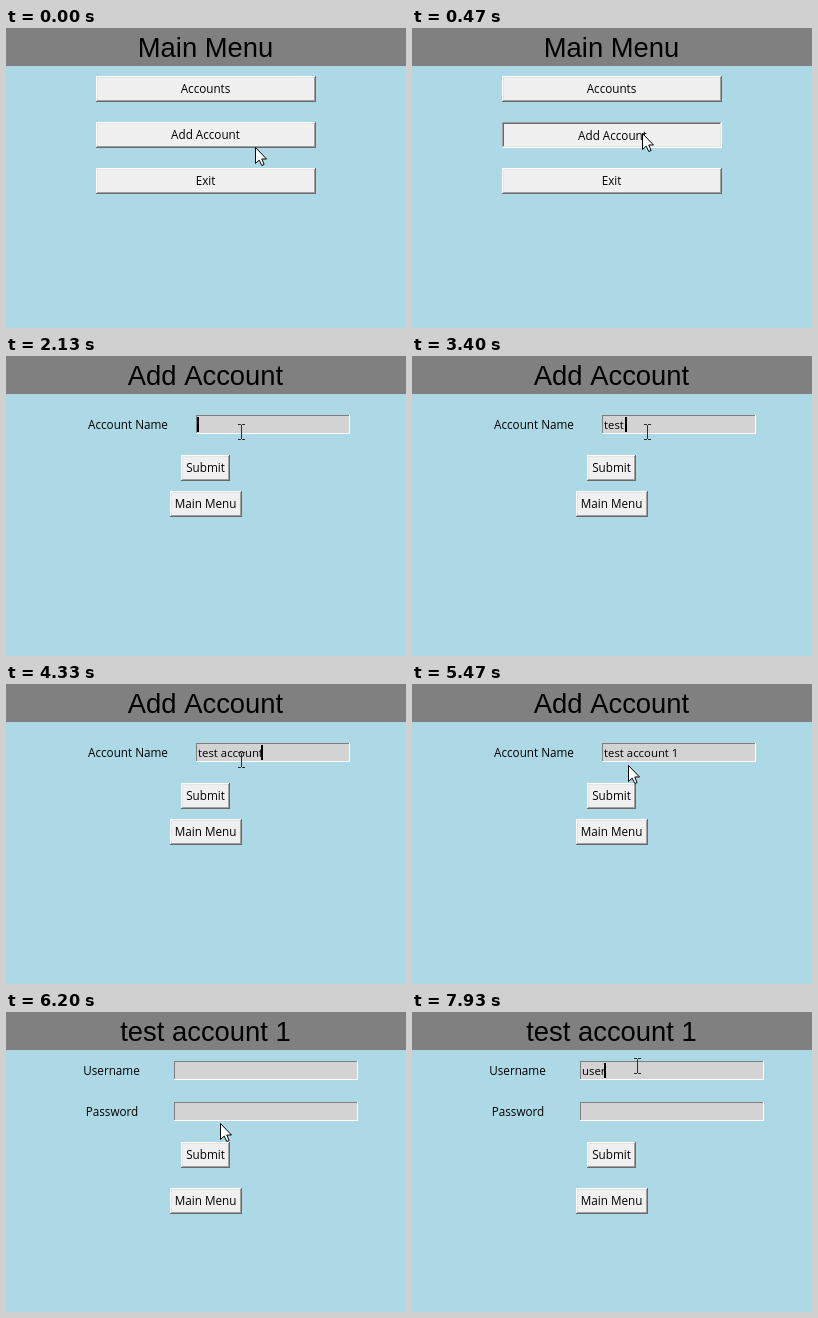
Write an HTML page with a canvas that moves like this. It is 400 px wide and 300 px high and loops after 8 s.

```html
<!DOCTYPE html>
<html lang="en">
<head>
<meta charset="utf-8">
<title>Account manager</title>
<style>
  html, body { margin: 0; overflow: hidden; background: #add8e6; }
  canvas { display: block; }
</style>
</head>
<body>
<canvas id="stage" width="400" height="300"></canvas>
<script>
const ctx = document.getElementById('stage').getContext('2d');
const LOOP = 8000;
const UI_FONT = '11.7px "Open Sans", sans-serif';
const ENTRY_FONT = '11.4px "Open Sans", sans-serif';
const TITLE_FONT = '27.4px "Liberation Sans", Arial, sans-serif';
const CENTER = 199.5;
const ROW = 19;
const BUTTON_HEIGHT = 26;

// Each burst of typing has a text, a start time and a steady pace per key
const accountName = {
  label: 'Account Name', labelX: 122, x: 190, y: 59, w: 154, focus: 1200,
  bursts: [['t', 2470, 0], ['est account ', 2870, 145], ['1', 5200, 0]]
};
const username = {
  label: 'Username', labelX: 105.5, x: 168, y: 49, w: 184, focus: 6600,
  bursts: [['user', 7600, 110]]
};
const password = {
  label: 'Password', labelX: 106, x: 168, y: 90, w: 184, focus: Infinity, bursts: []
};

const menuItems = ['Accounts', 'Add Account', 'Exit'];
const submit = y => ({ label: 'Submit', y, w: 49 });
const mainMenu = y => ({ label: 'Main Menu', y, w: 72 });

const screens = [
  {
    title: 'Main Menu', until: 530, clicked: 'Add Account', fields: [],
    buttons: menuItems.map((label, i) => ({ label, y: 48 + 46 * i, w: 220 }))
  },
  {
    title: 'Add Account', until: 6000, clicked: 'Submit', fields: [accountName],
    buttons: [submit(99), mainMenu(135)]
  },
  {
    title: 'test account 1', until: Infinity, fields: [username, password],
    buttons: [submit(130), mainMenu(176)]
  }
];

// Pointer moves: start time, end time, destination
const pointerStart = [249, 119];
const pointerMoves = [
  [0, 270, 230, 105], [670, 1070, 235, 76], [5410, 5470, 216, 81],
  [5470, 5730, 214, 116], [6180, 6275, 211, 87], [6410, 6530, 225, 54]
];

function rect(color, x, y, w, h) {
  ctx.fillStyle = color;
  ctx.fillRect(x, y, w, h);
}

function text(str, x, y, font = UI_FONT, align = 'center') {
  ctx.font = font;
  ctx.textAlign = align;
  ctx.fillStyle = '#000';
  ctx.fillText(str, x, y);
}

function bevel(x, y, w, h, topLeft, bottomRight) {
  rect(topLeft, x, y, w, 1);
  rect(topLeft, x, y, 1, h);
  rect(bottomRight, x, y + h - 1, w, 1);
  rect(bottomRight, x + w - 1, y, 1, h);
}

function button({ label, y, w }, down) {
  const x = Math.floor(200 - w / 2);
  const h = BUTTON_HEIGHT;
  rect('#f0f0f0', x, y, w, h);
  bevel(x, y, w, h, ...(down ? ['#a0a0a0', '#fff'] : ['#fff', '#696969']));
  bevel(x + 1, y + 1, w - 2, h - 2, ...(down ? ['#696969', '#e3e3e3'] : ['#e3e3e3', '#a0a0a0']));
  text(label, CENTER + down, y + 17 + down);
}

function typedAt(bursts, t) {
  return bursts.map(([str, start, pace]) =>
    [...str].filter((_, i) => t >= start + i * pace).join('')).join('');
}

function field({ label, labelX, x, y, w, focus, bursts }, t) {
  const typed = typedAt(bursts, t);
  text(label, labelX, y + 14);
  rect('#d3d3d3', x, y, w, ROW);
  bevel(x, y, w, ROW, '#7f7f7f', '#fff');
  text(typed, x + 2, y + 14, ENTRY_FONT, 'left');
  if (t >= focus && (t - focus) % 910 < 590) {
    rect('#000', x + 1 + Math.floor(ctx.measureText(typed).width), y + 2, 2, 15);
  }
}

function pointerAt(t) {
  let [x, y] = pointerStart;
  for (const [start, end, toX, toY] of pointerMoves) {
    const k = Math.min(1, Math.max(0, (t - start) / (end - start)));
    const eased = k * k * (3 - 2 * k);
    x += (toX - x) * eased;
    y += (toY - y) * eased;
  }
  return [Math.round(x), Math.round(y)];
}

function arrow(x, y) {
  ctx.save();
  ctx.translate(x + .5, y + .5);
  const shape = new Path2D('M0 0V16L3.7 12.6 6.3 18 8.6 17 6.3 11.5H11Z');
  ctx.lineJoin = 'round';
  ctx.fillStyle = '#fff';
  ctx.fill(shape);
  ctx.stroke(shape);
  ctx.restore();
}

function iBeam(x, y) {
  const color = '#2c2c2c';
  for (const serifY of [y - 8, y + 7]) {
    rect(color, x - 3, serifY, 3, 1);
    rect(color, x + 1, serifY, 3, 1);
  }
  rect(color, x, y - 7, 1, 14);
}

function draw(t) {
  const { title, until, clicked, fields, buttons } = screens.find(s => t < s.until);
  rect('#add8e6', 0, 0, 400, 300);
  rect('#808080', 0, 0, 400, 38);
  text(title, CENTER, 29, TITLE_FONT);
  fields.forEach(f => field(f, t));
  buttons.forEach(b => button(b, b.label === clicked && t >= until - 65));

  const [x, y] = pointerAt(t);
  const overField = fields.some(f => x >= f.x && x < f.x + f.w && y >= f.y && y < f.y + ROW);
  (overField ? iBeam : arrow)(x, y);
}

// The screen updates 15 times per second
function frame() {
  const tick = Math.floor((performance.now() % LOOP + 3.4) * .015) % 120;
  draw(tick / .015 + 4);
  requestAnimationFrame(frame);
}
frame();
</script>
</body>
</html>
```
